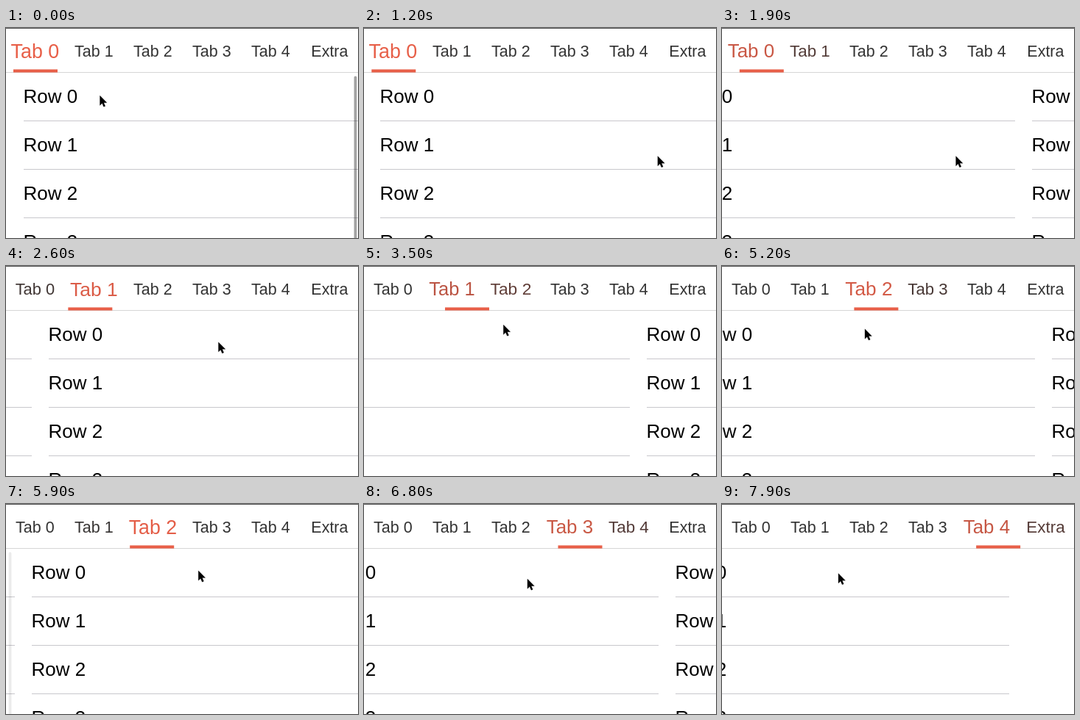
These frames come from a looping animation (478x286 px, 8 s). An HTML page:

```html
<!DOCTYPE html>
<html lang="en">
<head>
<meta charset="utf-8">
<title>Swipeable tabs</title>
<style>
  html, body { margin: 0; width: 100%; height: 100%; overflow: hidden; background: #fff; }
  svg { display: block; width: 478px; height: 286px; }
  text { font-family: "Liberation Sans", Arial, sans-serif; }
</style>
</head>
<body>
<svg id="stage" viewBox="0 0 478 286">
  <rect width="478" height="286" fill="#fff"/>
  <g id="pages"></g>
  <rect width="478" height="1" fill="#5a5a5a"/>
  <rect y="60" width="478" height="1" fill="#d6d6d6"/>
  <g id="tabs"></g>
  <rect id="marker" y="56.4" width="60" height="4.1" fill="#e85f48"/>
  <path id="cursor" d="M0 0V13.4L3 10.6L5.1 15.3L7.3 14.4L5.3 9.7H9.5Z"
        stroke="#c4c4c4" paint-order="stroke"/>
</svg>
<script>
const LOOP = 8000, STEP = 129, PAGE = 480, TAB = 80;
const REACH = .365; // share of a page dragged before letting go
const labels = ["Tab 0", "Tab 1", "Tab 2", "Tab 3", "Tab 4", "Extra"];
const plain = [51, 51, 51], accent = [232, 95, 72];

// One swipe per page: times of grab, release and rest, and the point grabbed
const swipes = [
  { grab: 1000, release: 2200, rest: 2800, x: 400.5, y: 174.5 },
  { grab: 3000, release: 3578, rest: 4094, x: 309.5, y: 80 },
  { grab: 4400, release: 6200, rest: 6600, x: 250.5, y: 80, sway: .314, drift: 13 },
  { grab: 6600, release: 6869, rest: 7450, x: 303, y: 102 },
  { grab: 7600, release: 7986, rest: 8500, x: 249, y: 94.5 }
];
const idle = { x: 127.5, y: 92 };

const flashes = [
  { page: 0, shown: 0, gone: 800 },
  { page: 1, shown: 5400, gone: 6030 },
  { page: 2, shown: 4200, gone: 5200 }
];

const byId = id => document.getElementById(id);
const mix = (a, b, u) => a + (b - a) * u;
const progress = (t, from, to) => Math.min(1, Math.max(0, (t - from) / (to - from)));
const easeOut = u => 1 - (1 - u) ** 2;

function add(parent, tag, attrs, text = "") {
  const el = document.createElementNS("http://www.w3.org/2000/svg", tag);
  for (const name in attrs) el.setAttribute(name, attrs[name]);
  el.textContent = text;
  return parent.appendChild(el);
}

// Share of a page that a swipe has moved: accelerating drag, then a soft stop
function travel({ grab, release, rest, sway = 0 }, t) {
  const u = progress(t, grab, release);
  const dragged = REACH * u ** 2.6 + sway * u ** .47 * Math.sin(2 * Math.PI * u);
  return mix(dragged, 1, easeOut(progress(t, release, rest)));
}

function held(swipe, t) {
  const time = Math.min(t, swipe.release);
  const drift = (swipe.drift || 0) * progress(time, swipe.grab, swipe.release);
  return { x: swipe.x - PAGE * travel(swipe, time), y: swipe.y + drift };
}

// The pointer follows a drag, then glides over to the next grab
function pointerAt(t) {
  const next = swipes.findIndex(swipe => t < swipe.release);
  const target = swipes[next], previous = swipes[next - 1];
  if (t >= target.grab) return held(target, t);
  const from = previous ? held(previous, t) : idle;
  const u = easeOut(progress(t, previous ? previous.release : 0, target.grab));
  return { x: mix(from.x, target.x, u), y: mix(from.y, target.y, u) };
}

// The last tab's page is empty
const bars = [];
for (let page = 0; page < labels.length - 1; page++) {
  const g = add(byId("pages"), "g", { transform: `translate(${page * PAGE} 0)` });
  for (let row = 0; row < 4; row++) {
    add(g, "text", { x: 23.5, y: 102 + row * 66, "font-size": 26 }, `Row ${row}`);
    add(g, "rect", { x: 24, y: 126 + row * 66, width: 457, height: 1, fill: "#c8c7cc" });
  }
  bars.push(add(g, "rect", { x: 472.6, y: 65.5, width: 3.8, height: 240, rx: 1.9, opacity: 0 }));
}

const tabs = labels.map(label =>
  add(byId("tabs"), "text", { y: 7.5, "font-size": 21.5, "text-anchor": "middle" }, label));

function draw(t) {
  const pos = swipes.reduce((sum, swipe) => sum + travel(swipe, t), 0);
  byId("pages").setAttribute("transform", `translate(${Math.round(-pos * PAGE)} 0)`);
  byId("marker").setAttribute("x", 10 + pos * TAB);

  tabs.forEach((tab, i) => {
    const active = Math.max(0, 1 - Math.abs(pos - i));
    const color = plain.map((c, k) => Math.round(mix(c, accent[k], active)));
    tab.setAttribute("transform", `translate(${39.4 + i * TAB} 31.3) scale(${1 + active / 4})`);
    tab.setAttribute("fill", `rgb(${color})`);
  });

  for (const { page, shown, gone } of flashes) {
    const opacity = t < shown ? 0 : .36 * (1 - progress(t, gone - 600, gone));
    bars[page].setAttribute("opacity", opacity);
  }

  const { x, y } = pointerAt(t);
  byId("cursor").setAttribute("transform", `translate(${x} ${y})`);
}

// Pictures advance every STEP ms, aligned up to a tenth of a second
function heldTime(ms) {
  const tick = Math.floor(Math.floor(ms / 100) * 100 / STEP);
  return Math.ceil(tick * STEP / 100) * 100;
}

const start = performance.now();
function frame() {
  draw(heldTime((performance.now() - start) % LOOP));
  requestAnimationFrame(frame);
}
frame();
</script>
</body>
</html>
```
